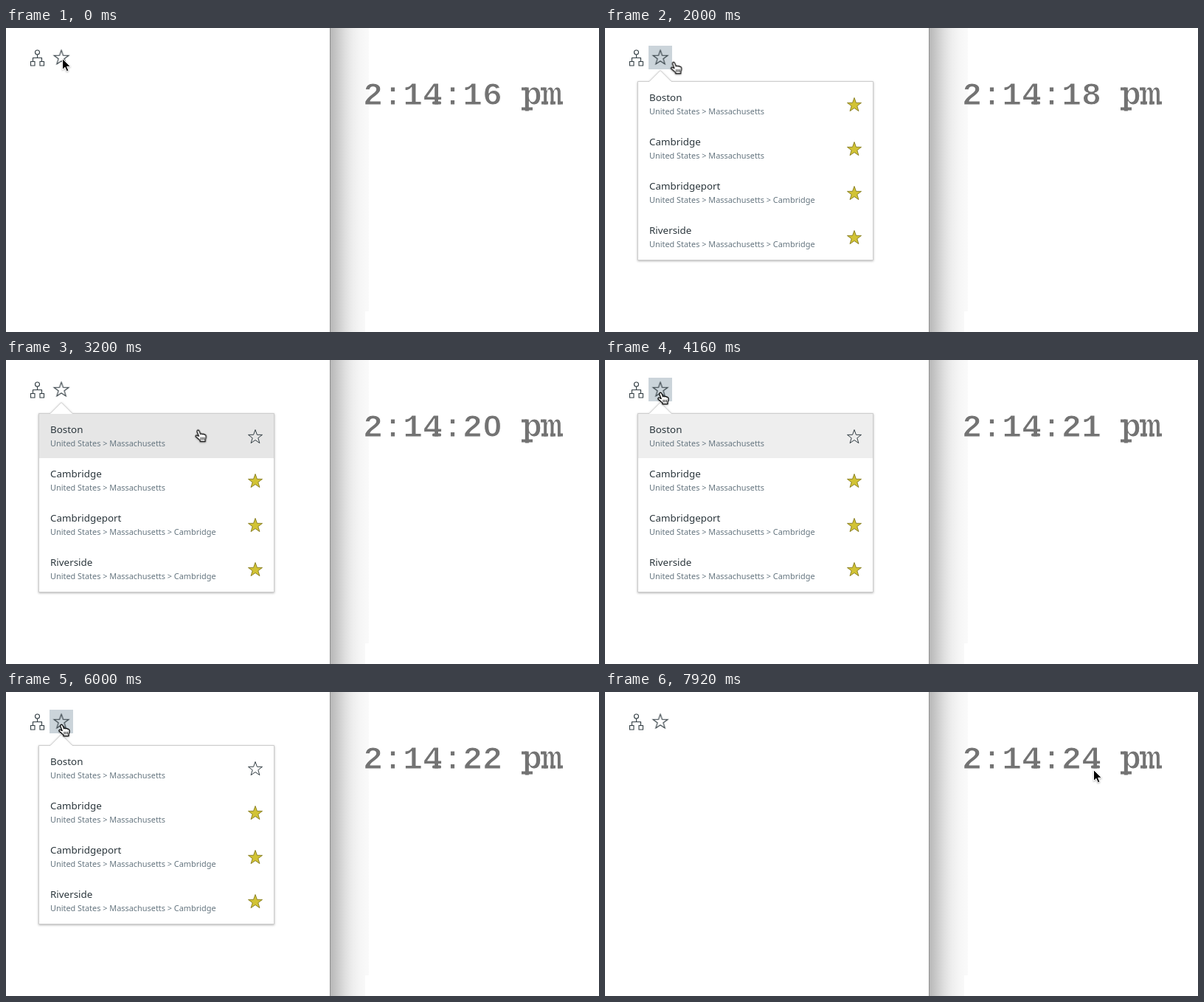
Recreate the animation shown at these times as an HTML page. Size 804 px wide and 412 px high, loop 8000 ms.

```html
<!DOCTYPE html>
<html lang="en">
<head>
<meta charset="utf-8">
<title>Favorites menu</title>
<style>
html, body { margin: 0; width: 100%; height: 100%; overflow: hidden; background: #fff; }
svg { display: block; width: 804px; height: 412px; }
.clock { font: bold 45px "Courier New", "Liberation Mono", monospace; fill: #737373; white-space: pre; }
/* a white rim thins the heavy strokes */
.clock text { stroke: #fff; stroke-width: 1.1px; stroke-linejoin: round; }
.name { font: 13.4px "Noto Sans", "Open Sans", sans-serif; fill: #2b363c; }
.path { font: 10.9px "Noto Sans", "Open Sans", sans-serif; fill: #667680; }
.icon { fill: none; stroke: #333e44; stroke-width: 1.1; }
.on { fill: #d2c334; stroke: #8d8326; stroke-width: 1; }
.off { fill: none; stroke: #333e44; stroke-width: 1; }
.bubble { fill: #fff; stroke: #cdcdcd; filter: drop-shadow(0 1px 1.5px rgba(0, 0, 0, .3)); }

.reel, .menu, .starred, .unstarred, .hover, .hand, .arrow { animation: 8s step-end infinite; }
.reel { animation-name: tick; }
.menu { animation-name: menu; }
.starred { animation-name: starred; }
.unstarred { animation-name: unstarred; }
.hover { animation-name: hover; }
.hand { animation-name: hand; }
.arrow { animation-name: arrow; }
.row { animation: row 8s linear infinite; }
.pointer { animation: move 8s ease-in-out infinite; filter: drop-shadow(0 1px 1px rgba(0, 0, 0, .3)); }

@keyframes tick {
  0% { transform: translateY(0); }
  1.5% { transform: translateY(-60px); }
  14% { transform: translateY(-120px); }
  26.5% { transform: translateY(-180px); }
  39% { transform: translateY(-240px); }
  51.5% { transform: translateY(-300px); }
  64% { transform: translateY(-360px); }
  76.5% { transform: translateY(-420px); }
  89%, 100% { transform: translateY(-480px); }
}
@keyframes menu { 0%, 80%, 100% { opacity: 0; } 18% { opacity: 1; } }
@keyframes starred { 0% { opacity: 1; } 35%, 100% { opacity: 0; } }
@keyframes unstarred { 0% { opacity: 0; } 35%, 100% { opacity: 1; } }
@keyframes hover { 0%, 26%, 87%, 100% { opacity: 0; } 2.5%, 45% { opacity: 1; } }
@keyframes hand { 0%, 87%, 100% { opacity: 0; } 2.5% { opacity: 1; } }
@keyframes arrow { 0%, 87%, 100% { opacity: 1; } 2.5% { opacity: 0; } }
@keyframes row {
  0%, 28.5% { opacity: 0; }
  30.5%, 47% { opacity: 1; }
  52% { opacity: .66; }
  58%, 100% { opacity: 0; }
}
@keyframes move {
  0%, 1% { transform: translate(76px, 42px); }
  5%, 22% { transform: translate(76px, 44px); animation-timing-function: ease-in; }
  25% { transform: translate(92px, 46px); animation-timing-function: ease-out; }
  33%, 36% { transform: translate(338px, 100px); animation-timing-function: ease-in; }
  40% { transform: translate(261px, 95px); animation-timing-function: ease-out; }
  45%, 75% { transform: translate(75px, 44px); }
  82%, 85% { transform: translate(85px, 43px); animation-timing-function: ease-in; }
  87% { transform: translate(98px, 50px); animation-timing-function: ease-in-out; }
  98%, 100% { transform: translate(662px, 106px); }
}
</style>
</head>
<body>
<svg viewBox="0 0 804 412">
  <defs>
    <linearGradient id="shade" gradientUnits="userSpaceOnUse" x1="439" x2="491">
      <stop offset="0" stop-color="#b6b6b6"/>
      <stop offset=".2" stop-color="#cacaca"/>
      <stop offset=".4" stop-color="#dfdfdf"/>
      <stop offset=".6" stop-color="#eee"/>
      <stop offset=".8" stop-color="#f6f6f6"/>
      <stop offset="1" stop-color="#fafafa"/>
    </linearGradient>
    <clipPath id="window"><rect x="615" y="64" width="60" height="52"/></clipPath>
    <path id="star" d="M0-10 2.4-3.2 9.5-3.1 3.8 1.2 5.9 8.1 0 4 -5.9 8.1 -3.8 1.2 -9.5-3.1 -2.4-3.2Z"/>
  </defs>

  <path fill="url(#shade)" d="M439 0H492V384H487V412H439Z"/>
  <rect x="439" width="1" height="412" fill="#8f8f8f"/>

  <g class="clock" transform="translate(0 -.5)">
    <text x="484" y="104">2:14:</text>
    <rect x="578" y="100" width="12" height="4" rx="1.5"/>
    <g clip-path="url(#window)">
      <g class="reel">
        <text x="619" y="104">16</text>
        <text x="619" y="164">17</text>
        <text x="619" y="224">18</text>
        <text x="619" y="284">19</text>
        <text x="619" y="344">20</text>
        <ellipse cx="659.5" cy="328.7" rx="4" ry="5.5" fill="#fff"/>
        <text x="619" y="404">21</text>
        <text x="619" y="464">22</text>
        <text x="619" y="524">23</text>
        <text x="619" y="584">24</text>
        <rect x="659" y="580" width="12" height="4" rx="1.5"/>
      </g>
    </g>
    <text x="700" y="104">pm</text>
    <!-- slab serifs -->
    <path d="M699 81h7v4h-7zM699 108h15v4h-15zM725 81h5v4h-5zM726 100h9v4h-9zM738 100h7v4h-7zM748 100h7v4h-7z"/>
  </g>

  <rect class="hover" x="59" y="24" width="32" height="32" fill="#cbd4da"/>
  <g class="icon">
    <circle cx="42.5" cy="33" r="3"/>
    <path d="M42.5 36v4.5M36.5 45v-4.5h12V45M33.5 45.5h5.5v5.5h-5.5zM46 45.5h5.5v5.5H46z"/>
    <use href="#star" transform="translate(75 40.5) scale(1.04)"/>
  </g>

  <g class="menu">
    <path class="bubble" d="M44.5 72.5H60L75 57.5 90 72.5H363.5V314.5H44.5Z"/>
    <rect class="row" x="45" y="73" width="318" height="60" fill="#e6e6e6"/>
    <g class="name">
      <text x="60" y="99">Boston</text>
      <text x="60" y="159">Cambridge</text>
      <text x="60" y="219">Cambridgeport</text>
      <text x="60" y="279">Riverside</text>
    </g>
    <g class="path">
      <text x="60" y="117">United States &gt; Massachusetts</text>
      <text x="60" y="177">United States &gt; Massachusetts</text>
      <text x="60" y="237">United States &gt; Massachusetts &gt; Cambridge</text>
      <text x="60" y="297">United States &gt; Massachusetts &gt; Cambridge</text>
    </g>
    <g class="starred"><use class="on" href="#star" x="338" y="104.5"/></g>
    <g class="unstarred"><use class="off" href="#star" x="338" y="104.5"/></g>
    <g class="on">
      <use href="#star" x="338" y="164.5"/>
      <use href="#star" x="338" y="224.5"/>
      <use href="#star" x="338" y="284.5"/>
    </g>
  </g>

  <g class="pointer">
    <path class="arrow" fill="#000" stroke="#fff" d="M.5-.5V14.5L4 11.3 6.3 16.8 8.9 15.7 6.6 10.3H11.4Z"/>
    <g class="hand" fill="#fff" stroke="#000" stroke-width="1.2" stroke-linejoin="round" stroke-linecap="round">
      <path d="M1.2 8.5-.9 3.2C-1.6 1.4-.8.2.3.2 1.2.2 1.7.9 2.1 2L3.6 5.8C4.2 4.7 5.7 4.7 6.2 5.9 7 5 8.3 5.3 8.6 6.4 9.6 5.8 10.7 6.5 10.9 7.8 11.2 10 11 11.4 10 13.2V15.7H3V14.2C1.3 12.7-.6 11.2-2.7 9.3-3.7 8.3-2.8 6.8-1.4 7.3Z"/>
      <path fill="none" stroke-width=".9" d="M4 10.2v3M6.2 10.2v3M8.4 10.2v3"/>
    </g>
  </g>
</svg>
</body>
</html>
```
